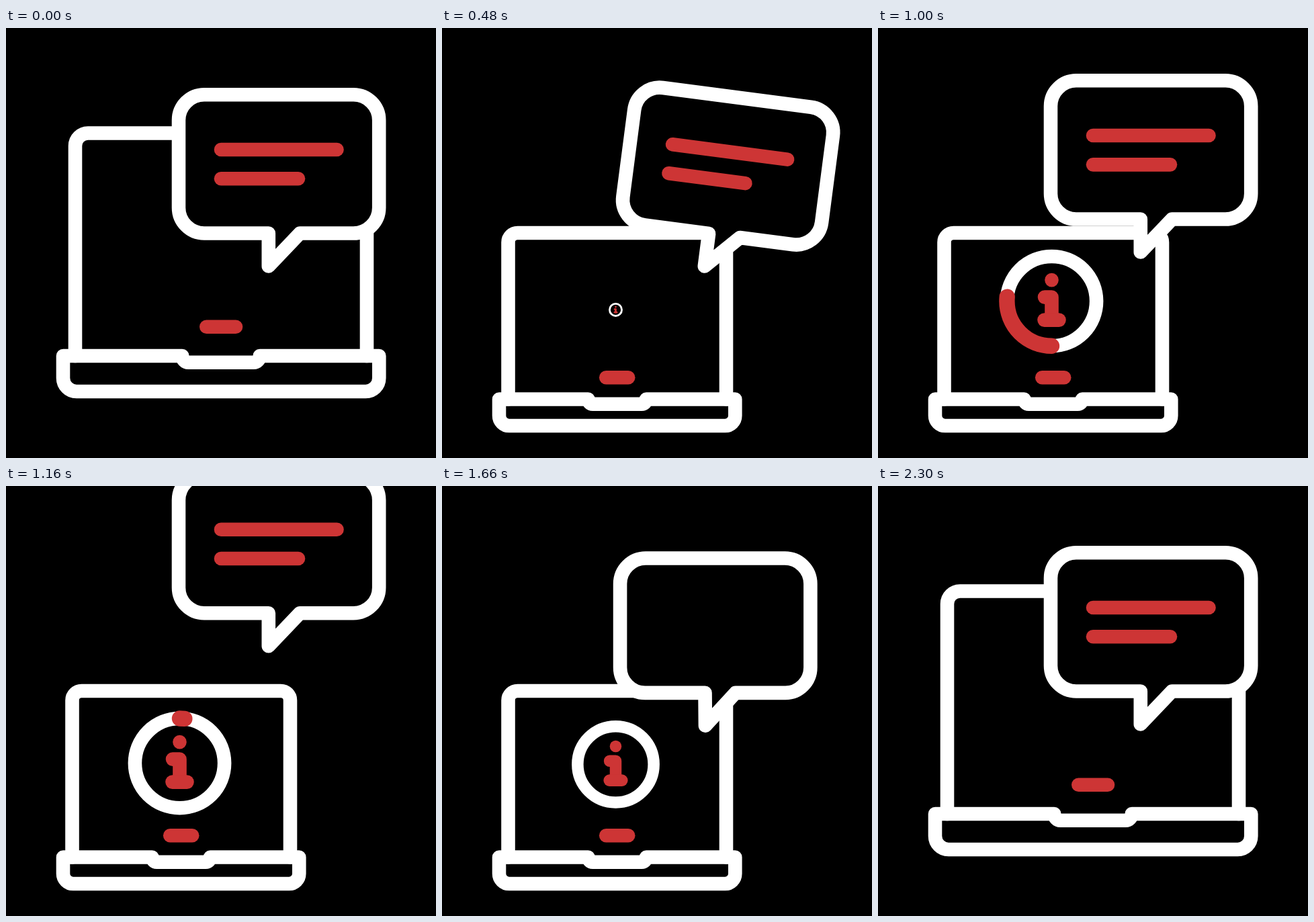
These frames come from a looping animation (640 px wide and 640 px high, 2.4 s). An HTML page with a canvas:

```html
<!DOCTYPE html>
<html lang="en">
<head>
<meta charset="utf-8">
<style>
  html, body { margin: 0; height: 100%; overflow: hidden; background: #000; }
  canvas { display: block; }
</style>
</head>
<body>
<canvas id="stage" width="640" height="640"></canvas>
<script>
const ctx = document.getElementById('stage').getContext('2d');
const LOOP = 2400, WHITE = '#fff', RED = '#cd3535', WEIGHT = 20.6;

// Eased progress 0..1 between two times
const ease = (t, from, to) => {
  const s = Math.min(1, Math.max(0, (t - from) / (to - from)));
  return s * s * (3 - 2 * s);
};
const mix = (a, b, p) => a + (b - a) * p;
const mixAll = (a, b, p) => a.map((v, i) => mix(v, b[i], p));

function stroke(color, width = WEIGHT) {
  ctx.strokeStyle = color;
  ctx.lineWidth = width;
  ctx.stroke();
}

function line(color, ...pts) {
  ctx.beginPath();
  for (let i = 0; i < pts.length; i += 2) ctx.lineTo(pts[i], pts[i + 1]);
  stroke(color);
}

// Line to (x0, y0), then a rounded turn around corner (cx, cy) to (x1, y1)
function turn(x0, y0, cx, cy, x1, y1) {
  const k = 0.55;
  ctx.lineTo(x0, y0);
  ctx.bezierCurveTo(mix(x0, cx, k), mix(y0, cy, k), mix(x1, cx, k), mix(y1, cy, k), x1, y1);
}

// screen left, right, top, radius | base right, top, bottom, radius | notch left, right, depth | bar left, right, y
const LARGE = [103, 537, 156.5, 19, 555.3, 488, 541, 20, 262.3, 377.7, 9.7, 298.3, 342, 444.7];
const SMALL = [98.5, 423, 305, 14, 436.3, 552.5, 592, 15, 217.5, 304, 7.2, 244.2, 277.2, 520.2];

function laptop(p) {
  const [l, r, top, sr, right, y, bottom, br, n0, n1, depth, b0, b1, by] = mixAll(LARGE, SMALL, p);
  const left = 85, ny = y + depth, nr = depth * 0.95;
  ctx.beginPath();
  ctx.moveTo(l, y);
  turn(l, top + sr, l, top, l + sr, top);
  turn(r - sr, top, r, top, r, top + sr);
  ctx.lineTo(r, y);
  stroke(WHITE);

  ctx.beginPath();
  ctx.moveTo(left, y);
  turn(n0, y, n0, ny, n0 + nr, ny);
  turn(n1 - nr, ny, n1, ny, n1, y);
  ctx.lineTo(right, y);
  turn(right, bottom - br, right, bottom, right - br, bottom);
  turn(left + br, bottom, left, bottom, left, bottom - br);
  ctx.closePath();
  stroke(WHITE);
  line(RED, b0, by, b1, by);
}

// left, right, top, bottom, bottom corner ends, tail start, tip x, tip y, tail end
const FULL = [257, 555.2, 99.2, 305.5, 295, 517, 390.8, 390.8, 354.5, 437.5];
const BUD = [377.4, 453.4, 223.2, 341, 401, 428.4, 401.3, 407.7, 388.3, 428.4];

function bubble(grow, line1, line2) {
  const [l, r, t, b, bl, br, a, tx, ty, c] = mixAll(BUD, FULL, grow), q = 38;
  ctx.beginPath();
  ctx.moveTo(l, t + q);
  turn(l, t + q, l, t, l + q, t);
  turn(r - q, t, r, t, r, t + q);
  turn(r, b - q, r, b, br, b);
  ctx.lineTo(c, b);
  ctx.lineTo(tx, ty);
  ctx.lineTo(a, b);
  turn(bl, b, l, b, l, b - q);
  ctx.closePath();
  ctx.fillStyle = '#000';
  ctx.fill();
  stroke(WHITE);
  if (line1) line(RED, 320, 181, 320 + 172.5 * line1, 181);
  if (line2) line(RED, 320, 224.3, 320 + 115 * line2, 224.3);
}

function infoBadge(t) {
  const scale = ease(t, 433, 640) * (1 - ease(t, 1600, 1850));
  if (!scale) return;
  const radius = 66.6;
  ctx.save();
  ctx.translate(258.5, 413 - 7.5 * Math.sin((t - 650) / 1040 * 2 * Math.PI));
  ctx.scale(scale, scale);
  ctx.beginPath();
  ctx.arc(0, 0, radius, 0, 2 * Math.PI);
  stroke(WHITE);

  // Two sweeps of the red arc; its tail starts late and catches up
  const lap = 407, since = t - 722;
  if (since > 0 && since < 2 * lap) {
    const u = since % lap;
    const angle = p => (p - 0.25) * 2 * Math.PI;
    ctx.beginPath();
    ctx.arc(0, 0, radius, angle(ease(u, 158, 400)), angle(ease(u, 0, lap)));
    stroke(RED, 23.4);
  }

  line(RED, 0, -31.5, 0, -31.5);
  line(RED, -10.5, -6, 0, -6, 0, 28);
  line(RED, -11, 28, 11, 28);
  ctx.restore();
}

function draw(t) {
  ctx.fillStyle = '#000';
  ctx.fillRect(0, 0, 640, 640);
  ctx.lineCap = ctx.lineJoin = 'round';

  laptop(ease(t, 100, 433) - ease(t, 2012, 2300));
  infoBadge(t);

  if (t < 1600) {
    const tilt = 10 * ease(t, 102, 402) - 15 * ease(t, 402, 702) + 5 * ease(t, 702, 1000);
    ctx.save();
    ctx.translate(390.8, 354.5 - 371 * ease(t, 900, 1600));
    ctx.rotate(tilt * Math.PI / 180);
    ctx.translate(-390.8, -354.5);
    bubble(1, 1, 1);
    ctx.restore();
  }
  if (t >= 1240) bubble(ease(t, 1240, 1740), ease(t, 1800, 2100), ease(t, 2000, 2300));
}

function tick() {
  draw(performance.now() % LOOP);
  requestAnimationFrame(tick);
}
tick();
</script>
</body>
</html>
```
